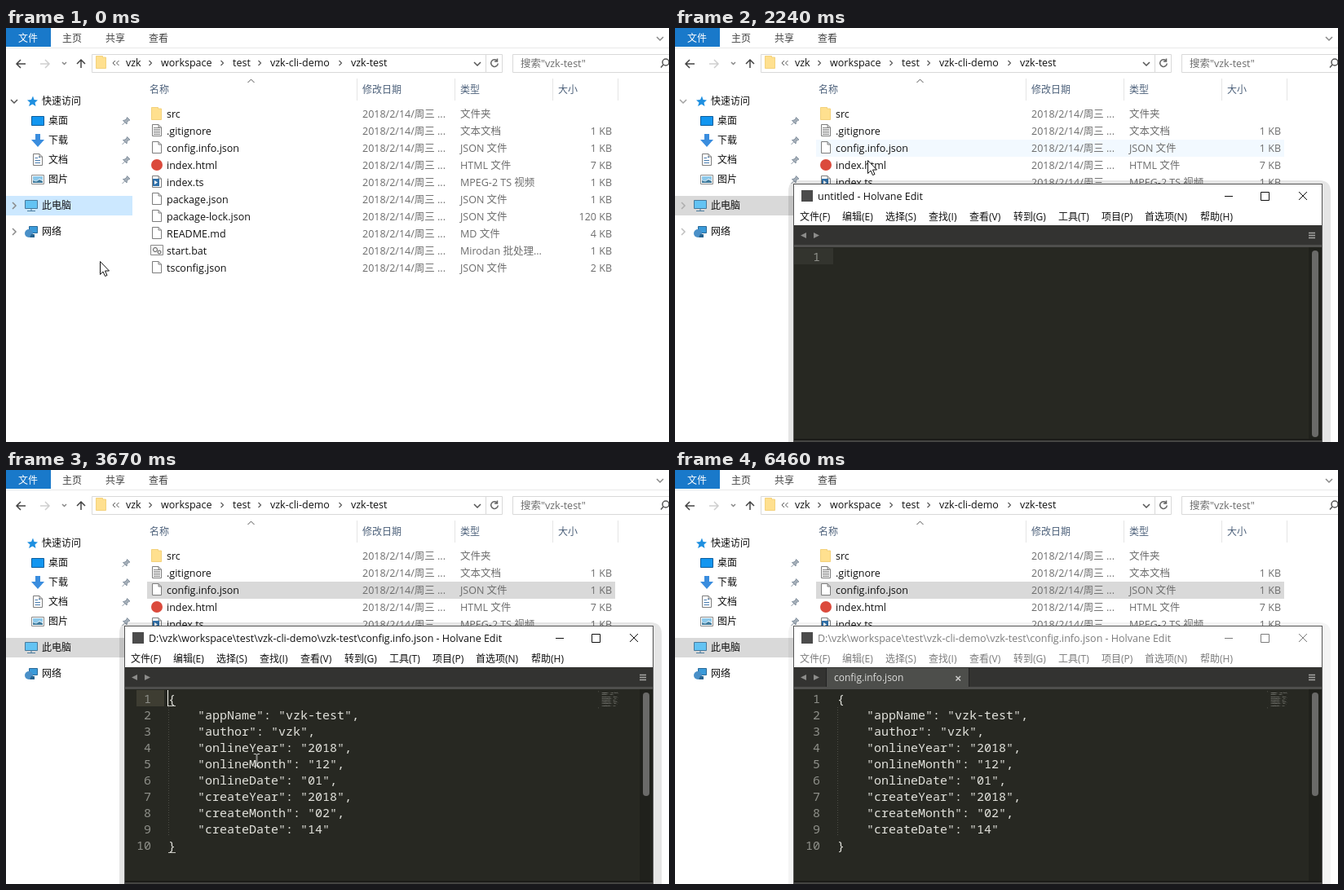
Animation, 813 px wide and 508 px high, one loop 6560 ms. Source, as an HTML page:

```html
<!DOCTYPE html>
<html lang="zh-CN">
<head>
<meta charset="utf-8">
<title>Open a file by dragging</title>
<style>
html, body { margin: 0; width: 100%; height: 100%; overflow: hidden; background: #fff; }
svg { display: block; width: 813px; height: 508px; }
text { font: 12.5px "Open Sans", "Noto Sans CJK SC", "Noto Sans CJK", "Noto Sans", sans-serif; fill: #111; }
.cjk { font-size: 12px; }
.dim { fill: #6d6d6d; }
.tab { fill: #444; }
.head { fill: #4c607a; }
.end { text-anchor: end; }
.code { font: 15px "Noto Sans Mono", "DejaVu Sans Mono", monospace; fill: #e2e2dc; }
.num { fill: #8f908a; text-anchor: end; }
.line { fill: none; stroke: #555; }
.wide { stroke-width: 1.5; }
</style>
</head>
<body>
<svg viewBox="0 0 813 508">
  <defs>
    <path id="right" fill="none" stroke="currentColor" stroke-width="1.500" d="M-2 -4L2 0L-2 4"/>
    <path id="down" class="line wide" d="M-4 -2L0 2L4 -2"/>
    <g id="pin" fill="#a3adb7" stroke="#8895a2">
      <path d="M1.500 -4.500L5 -1L3.500 -.5L1.500 1.500L1 4L-3.500 -.5L-1 -1L1 -3Z"/><path d="M-1.500 2L-4.500 5"/>
    </g>
    <path id="folder" fill="#ffe08f" stroke="#f0cb6a" stroke-width=".8" d="M.5 .5H8.500V2H12.500V15.500H.5Z"/>
    <path id="page" fill="#fff" stroke="#7d7d7d" d="M.5 .5H8L11.500 4V14.500H.5ZM8 .5V4H11.500"/>
  </defs>

  <!-- ribbon and address bar -->
  <path fill="#1979ca" d="M0 0H55V23H0Z"/>
  <path stroke="#e9e9e9" d="M0 24.500H813"/>
  <g class="line wide">
    <path stroke="#444" d="M24 44H13M18 39L13 44L18 49M92 49V39M87 44L92 39L97 44"/>
    <path stroke="#cfcfcf" d="M42 44H53M48 39L53 44L48 49"/>
    <path stroke="#666" d="M602 40A4.300 4.300 0 1 0 603.300 43.500M602.500 37.500V41H599"/>
    <path stroke="#555" d="M806 45L803 48.500"/><circle cx="809" cy="42" r="4" stroke="#555"/>
    <path stroke="#888" d="M69 42L71.500 44.500L74 42M798 11L802 15L806 11"/>
  </g>
  <path class="line" style="stroke:#d9d9d9" d="M105.500 32.500H608.500V54.500H105.500ZM588.500 33V54M813 32.500H621.500V54.500H813"/>
  <use href="#folder" x="110" y="34"/>
  <use href="#down" x="578" y="44"/>
  <path class="line" d="M134 40L131 43L134 46M138.500 40L135.500 43L138.500 46"/>
  <g id="path" color="#555"></g>

  <!-- navigation pane -->
  <path id="side" fill="#cce8ff" d="M0 206H155V230H0Z"/>
  <g id="arrows" color="#8a8a8a">
    <use href="#down" x="10" y="90"/><use href="#right" x="10" y="218"/><use href="#right" x="10" y="250"/>
  </g>
  <path fill="#1e8fe0" d="M33 83.500L34.500 88L39 88.500L35.500 91.500L36.500 96L32.500 93.500L28 96L29.500 91.500L26 88.500L31 88Z"/>
  <path fill="#1296f0" stroke="#0b5d9c" d="M31.500 108.500H46.500V119.500H31.500Z"/>
  <path fill="#3a8dde" d="M36 130H42V137H47L39 146L31 137H36Z"/>
  <use href="#page" x="33" y="154"/>
  <path stroke="#4a7cae" d="M35.500 159.500H39M35.500 162.500H42M35.500 165.500H42M40 158.500H42"/>
  <path fill="#fff" stroke="#8a8a8a" d="M31.500 180.500H46.500V191.500H31.500Z"/>
  <path fill="#8cc8ea" d="M33 182H45V187L41 185L37 188L33 186.500Z"/>
  <path fill="#3e7a9c" d="M33 187L37 188.500L41 186L45 188V190H33Z"/>
  <path fill="#63c3f3" stroke="#48799b" d="M23.500 211.500H38.500V221.500H23.500Z"/>
  <path stroke="#48799b" d="M31 222V225M26 224.500H36"/>
  <path fill="#3a9ad9" stroke="#2b6a98" d="M28.500 243.500H38.500V251.500H28.500Z"/>
  <circle cx="28" cy="252" r="5" fill="#4a90c8"/><path fill="#27638f" d="M31 253H35V257H29Z"/>

  <!-- file list -->
  <path class="line" d="M296.500 67L300.500 63L304.500 67"/>
  <path stroke="#e5e5e5" d="M430.500 62V89M550.500 62V89M670.500 62V89M750.500 62V89"/>
  <path id="row" fill="#e5f3ff" d="M173 137H747V158H173Z"/>
  <g id="files"></g>

  <!-- editor window -->
  <g id="win">
    <path id="shade" fill="#000" fill-opacity=".1" d="M139 508V200Q139 187 152 187H790Q804 187 804 201V508Z"/>
    <path fill="#555" d="M145 191H794V508H145Z"/>
    <path fill="#fff" d="M146 192H793V243H146Z"/>
    <path fill="#272822" d="M146 242H793V508H146Z"/>
    <path fill="#333331" d="M146 242H793V266H146Z"/>
    <path fill="#4f4f4d" d="M146 266H793V269H146Z"/>
    <path fill="#20211c" d="M777 269H793V505H777Z"/>
    <path fill="#1b1b18" d="M146 504H793V506H146Z"/>
    <path fill="#454543" d="M146 506H793V508H146Z"/>
    <path fill="#4b4b4b" d="M155 199H169V213H155Z"/>
    <path fill="#8c8c8a" d="M161 251V258L154 254.500ZM170 251V258L177 254.500Z"/>
    <path stroke="#a5a5a3" stroke-width="1.500" d="M777 251.500H785M777 254.500H785M777 257.500H785"/>
    <g id="label">
      <path class="line" style="stroke:#111" d="M674 206.500H684M718.500 201.500H728.500V211.500H718.500ZM765 201L775 211M775 201L765 211"/>
      <g id="menu"></g>
      <text id="blankTitle" x="175" y="211">untitled - Holvane Edit</text>
      <text id="fullTitle" x="175" y="211">D:\vzk\workspace\test\vzk-cli-demo\vzk-test\config.info.json - Holvane Edit</text>
    </g>
    <g id="blank">
      <path class="lit" fill="#33342e" d="M146 270H194V290H146Z"/>
      <text class="code num" x="178" y="286">1</text>
      <rect x="781" y="273" width="8" height="229" rx="4" fill="#6a6a68"/>
    </g>
    <g id="full">
      <g class="lit">
        <path fill="#3e3d32" d="M160 270H194V290H160Z"/>
        <path stroke="#c8c8c2" d="M199 289.500H208M199 469.500H208"/>
      </g>
      <path stroke="#4d4e47" stroke-dasharray="1 2" d="M199.500 291V450"/>
      <g id="code"></g>
      <g id="mini" transform="translate(726 240.500) scale(.11)"></g>
      <rect x="781" y="273" width="8" height="127" rx="4" fill="#6a6a68"/>
    </g>
    <g id="tab">
      <path fill="#4d4e4b" d="M186 243H360V267H186Z"/>
      <path stroke="#222" d="M185.500 243V266M360.500 243V266"/>
      <text class="cjk" style="fill:#dededc" x="195" y="259">config.info.json</text>
      <path stroke="#cfcfcd" stroke-width="1.500" d="M344.500 253L350 258.500M350 253L344.500 258.500"/>
    </g>
    <path id="caret" fill="#f8f8f0" d="M198 270H199V290H198Z"/>
  </g>

  <path id="beam" class="line" style="stroke:#e6e6e6" d="M-3.500 .5H-1L0 1.500L1 .5H3.500M0 1V15M-3.500 15.500H-1L0 14.500L1 15.500H3.500"/>
  <path id="arrow" fill="#fff" stroke="#111" d="M.5 .5V16.500L4 13L6.500 18.500L9 17.500L6.500 12H11.500Z"/>
</svg>
<script>
const LOOP = 6560;
const $ = id => document.getElementById(id);
const escapeText = s => s.replace(/&/g, '&amp;').replace(/</g, '&lt;');
const text = (x, y, s, cls = '') => `<text x="${x}" y="${y}" class="${cls}">${escapeText(s)}</text>`;
const use = (id, x, y) => `<use href="#${id}" x="${x}" y="${y}"/>`;
const put = (id, parts) => { $(id).innerHTML = parts.join(''); };

// Fixed labels
const places = ['桌面', '下载', '文档', '图片'];
put('path', [
  '<text class="cjk" x="15" y="17" style="fill:#fff">文件</text>',
  ...['主页', '共享', '查看'].map((s, i) => text(69 + 53 * i, 17, s, 'cjk tab')),
  ...[['vzk', 147], ['workspace', 190], ['test', 278], ['vzk-cli-demo', 324], ['vzk-test', 423]]
    .map(([s, x]) => text(x, 47, s)),
  ...[177, 265, 311, 410].map(x => `<g transform="translate(${x} 43) scale(.75)">${use('right', 0, 0)}</g>`),
  text(631, 48, '搜索"vzk-test"', 'dim'),
  text(44, 94, '快速访问', 'cjk'),
  ...places.map((s, i) => use('pin', 147, 114 + 24 * i))
]);

const pane = [
  ...places.map((s, i) => text(52, 118 + 24 * i, s, 'cjk')),
  text(44, 222, '此电脑', 'cjk'), text(44, 254, '网络', 'cjk'),
  ...[['名称', 176], ['修改日期', 437], ['类型', 557], ['大小', 677]].map(([s, x]) => text(x, 80, s, 'cjk head'))
];

const icons = {
  folder: y => use('folder', 178, y - 8),
  page: y => use('page', 179, y - 8),
  lines: y => use('page', 179, y - 8) +
    `<path stroke="#888" d="M181 ${y - 3.5}h8m-8 2h8m-8 2h8m-8 2h8m-8 2h8"/>`,
  dot: y => `<circle cx="185" cy="${y}" r="7" fill="#db4a3c"/>`,
  media: y => use('page', 179, y - 8) +
    `<path fill="#2f6fa8" d="M180 ${y - 4}h8v9h-8z"/><path fill="#fff" d="M182 ${y - 2}l4 2.500l-4 2.500z"/>`,
  gears: y => `<path fill="#f4f4f4" stroke="#8a8a8a" d="M177.500 ${y - 6.5}h15v12h-15z"/>` +
    `<g class="line"><circle cx="183" cy="${y - 1}" r="2.500"/><circle cx="188" cy="${y + 2}" r="2"/></g>`
};
const files = [
  ['src', '文件夹', '', 'folder'],
  ['.gitignore', '文本文档', 1, 'lines'],
  ['config.info.json', 'JSON 文件', 1, 'page'],
  ['index.html', 'HTML 文件', 7, 'dot'],
  ['index.ts', 'MPEG-2 TS 视频', 1, 'media'],
  ['package.json', 'JSON 文件', 1, 'page'],
  ['package-lock.json', 'JSON 文件', 120, 'page'],
  ['README.md', 'MD 文件', 4, 'page'],
  ['start.bat', 'Mirodan 批处理...', 1, 'gears'],
  ['tsconfig.json', 'JSON 文件', 2, 'page']
];
put('files', pane.concat(files.map(([name, type, size, icon], i) => {
  const y = 110 + 21 * i;
  return icons[icon](y - 5) + text(197, y, name) + text(437, y, '2018/2/14/周三 ...', 'dim') +
    text(557, y, type, 'dim') + (size && text(743, y, size + ' KB', 'dim end'));
})));

const menu = [['文件(F)', 153], ['编辑(E)', 205], ['选择(S)', 258], ['查找(I)', 311], ['查看(V)', 361],
  ['转到(G)', 415], ['工具(T)', 470], ['项目(P)', 523], ['首选项(N)', 576], ['帮助(H)', 644]];
put('menu', menu.map(([s, x]) => text(x, 236, s, 'cjk')));

const config = { appName: 'vzk-test', author: 'vzk', onlineYear: '2018', onlineMonth: '12', onlineDate: '01',
  createYear: '2018', createMonth: '02', createDate: '14' };
const source = JSON.stringify(config, null, 4).split('\n');
const codeLine = (s, i, x) => text(x + 9 * s.search(/\S/), 286 + 20 * i, s.trim(), 'code');
put('code', source.map((s, i) => text(178, 286 + 20 * i, String(i + 1), 'code num') + codeLine(s, i, 199)));
put('mini', source.map((s, i) => codeLine(s, i, 0)));

// Timeline: each key is a time in ms, held until the next one
let css = '';
function hold(selector, keys) {
  const name = 'k-' + selector.slice(1);
  const frames = Object.entries(keys)
    .map(([ms, rule]) => `${Math.max(0, ms - 1) / LOOP * 100}%{${rule}}`).join('');
  css += `@keyframes ${name}{${frames}}${selector}{animation:${name} ${LOOP}ms step-end infinite}`;
}
const alpha = keys => Object.fromEntries(Object.entries(keys).map(([ms, v]) => [ms, 'opacity:' + v]));
const fill = c => 'fill:' + c;
const at = (x, y) => `opacity:1;transform:translate(${x}px,${y}px)`;
const off = 'opacity:0';

hold('#win', alpha({ 0: 0, 1680: 1 }));
hold('#side', { 0: fill('#cce8ff'), 1680: fill('#d9d9d9') });
hold('#arrows', alpha({ 0: 1, 1960: .85, 2110: .7, 2240: .55, 2390: .4, 2520: .25, 2670: .1, 2800: 0 }));
hold('#row', {
  0: off, 2240: 'opacity:.5;fill:#e5f3ff', 2390: 'opacity:1;fill:#e5f3ff',
  2960: 'opacity:1;fill:#cce8ff', 3240: 'opacity:1;fill:#d9d9d9'
});
hold('#shade', alpha({ 0: 1, 2960: .45, 3240: 1, 6460: .45 }));
hold('#label', alpha({ 0: 1, 2960: .55, 3240: 1, 6460: .55 }));
hold('.lit', alpha({ 0: 1, 2960: 0, 3240: 1, 6460: 0 }));
for (const id of ['#blank', '#blankTitle']) hold(id, alpha({ 0: 1, 3670: 0 }));
for (const id of ['#full', '#fullTitle']) hold(id, alpha({ 0: 0, 3670: 1 }));
hold('#tab', alpha({ 0: 0, 3800: .5, 3920: 1 }));
hold('#caret', alpha({
  0: 1, 2110: .5, 2240: 0, 2670: .5, 2800: .8, 2960: 0, 3240: 1, 3390: .5, 3520: 0, 3670: 1, 4070: .5,
  4200: 0, 4630: .5, 4880: 1, 5030: .5, 5150: 0, 5720: .5, 5870: 1, 6150: .5, 6310: 0
}));
hold('#arrow', {
  0: at(115, 286), 440: off, 840: at(614, 478), 970: off, 2240: at(236, 162), 2390: at(222, 150),
  2520: at(214, 148), 2670: at(216, 146), 3110: at(268, 262), 3240: at(314, 366), 3390: off,
  5430: at(733, 272), 5560: off
});
hold('#beam', {
  0: off, 1960: at(584, 470), 2110: off, 3390: at(322, 369), 3520: at(314, 358), 3670: at(307.5, 348),
  4070: at(342, 356), 4200: at(396.5, 366), 4350: at(418, 372), 4480: at(434.5, 378), 4630: off,
  5150: at(580, 430), 5280: at(713.5, 470), 5430: off
});
document.head.appendChild(document.createElement('style')).textContent = css;
</script>
</body>
</html>
```
